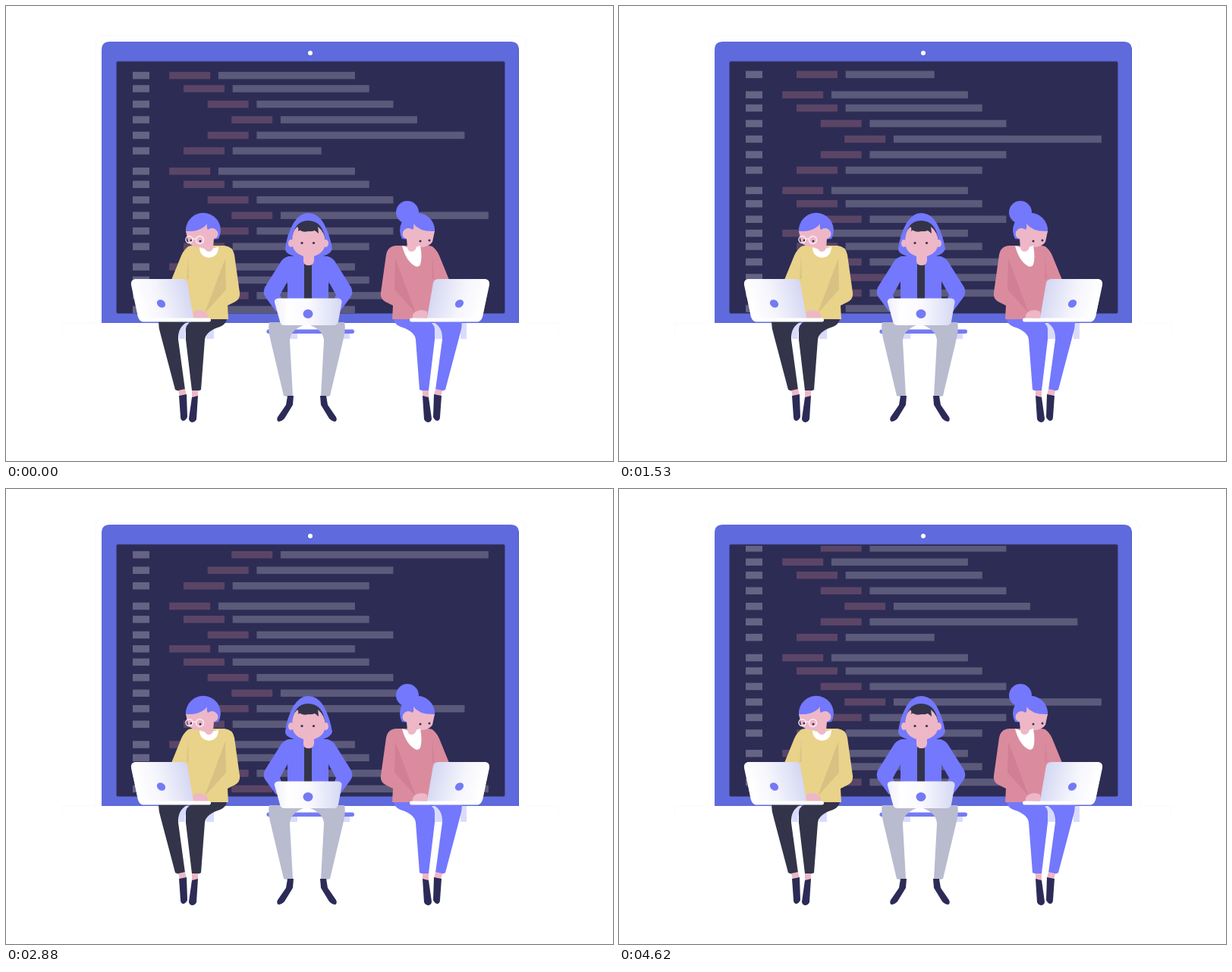
Recreate the animation shown at these times as an HTML page. Size 800 px wide and 600 px high, loop 4.65 s.

```html
<!DOCTYPE html>
<html lang="en">
<head>
<meta charset="utf-8">
<title>Coders</title>
<style>
  html, body { margin: 0; width: 100%; height: 100%; overflow: hidden; background: #fff; }
  svg { display: block; width: 800px; height: 600px; }
  .skin { fill: #edb7c7; }
  .blue { fill: #7378fd; }
  .dark { fill: #33344a; }
  .sock { fill: #2c2b57; }
  .pale { fill: #d9dbfd; }
  .logo { fill: #747af3; }
  .top { fill: var(--top); }
  .shade { fill: var(--shade); }
  .pants { fill: var(--pants); }
  .man { --top: #e9d28a; --shade: #d0b97f; --pants: #33344a; }
  .woman { --top: #da8c9e; --shade: #cc7890; --pants: #7378fd; }
</style>
</head>
<body>
<svg viewBox="0 0 800 600">
  <defs>
    <clipPath id="view"><rect x="146" y="75" width="511" height="330"/></clipPath>
    <linearGradient id="lid" x1="0" y1=".5" x2="1" y2=".3">
      <stop offset=".1" stop-color="#fff"/><stop offset=".45" stop-color="#f4f4fc"/><stop offset="1" stop-color="#d0d3f1"/>
    </linearGradient>
    <linearGradient id="lidFront">
      <stop offset="0" stop-color="#eeeef8"/><stop offset=".2" stop-color="#fff"/>
      <stop offset=".5" stop-color="#fafaff"/><stop offset="1" stop-color="#d5d8f3"/>
    </linearGradient>

    <g id="sitter">
      <path class="pants" d="M201 416H240Q226 423 227 440L236 506Q229 509 223 506L204 434Q201 425 201 416Z"/>
      <path class="pants" d="M237 426Q238 416 250 415L275 409H291Q292 419 282 423Q263 429 262 440L257 506Q251 509 245 507L237 440Z"/>
      <path class="skin" d="M227 507L236 505L238 513L229 515ZM245 507H253V515L245 517Z"/>
      <path class="sock" d="M228 514L238 512L239 542Q237 547 233 547Q230 546 230 542ZM245 516L253 514L251 545Q249 549 245 549Q241 548 241 544Z"/>
      <path class="top" d="M238 319Q240 316 246 316H288Q299 317 301 328L308 378Q309 386 302 390L292 395L293 413H242L236 361H218L229 334Q233 323 238 319Z"/>
      <path class="shade" d="M289 333L290 374L262 405Z" opacity=".65"/>
      <path class="shade" d="M240 329L241 360H238Z" opacity=".5"/>
      <path class="blue" d="M237 298A23 23 0 1 1 280 307L270 308L250 300Z"/>
      <path class="skin" d="M237 297Q257 298 265 287Q264 292 266 295Q274 290 279 298Q281 305 274 307L273 319Q272 324 267 324Q261 323 260 318Q245 319 240 311Z"/>
      <path class="skin" d="M246 411L247 403Q254 399 262 403Q267 406 266 412Z"/>
      <path fill="#d9dbf3" d="M171 360L165 365L174 410L180 416H190Z"/>
      <path fill="url(#lid)" d="M170 360H231Q238 360 239 365L247 411V416H180Q176 416 174 410L165 368Q164 361 170 360Z"/>
      <rect x="178" y="411.5" width="92" height="5" rx="2.5" fill="#fff"/>
      <ellipse class="logo" cx="204.5" cy="392.5" rx="6" ry="4.8" transform="rotate(35 204.5 392.5)"/>
      <g class="dark"><circle cx="256" cy="310" r="1.5"/><circle cx="244" cy="309" r="1.5"/></g>
    </g>

    <g id="sleeve">
      <path class="blue" d="M393 330H372Q366 332 363 336L341 371Q338 379 342 384L356 403L365 390L361 381L371 363V392H393Z"/>
    </g>
    <g id="leg">
      <path fill="#b9bbcf" d="M347 417H397L392 421Q374 428 374 442L378 514Q372 516 366 514L348 438Q345 425 347 417Z"/>
      <path class="sock" d="M371 514H379L378 526L367 544Q363 548 359 548Q356 546 358 542L369 526Z"/>
    </g>
  </defs>

  <path d="M75 434H74V418H118V50Q118 39 129 39H673Q685 39 685 50V418H728V434" fill="none" stroke="#fafafb"/>
  <path d="M126 418V58Q126 47 137 47H665Q676 47 676 58V418Z" fill="#5f6adc"/>
  <path d="M675.5 56V418" stroke="#5058bd"/>
  <rect x="145.5" y="73" width="512" height="332.5" rx="2" fill="#2d2c54" stroke="#4b50a0" stroke-width=".7"/>
  <circle cx="401" cy="62" r="3" fill="#fff"/>
  <g clip-path="url(#view)"><g id="code"></g></g>

  <path class="pale" d="M226 418H274V439H264V430H236V439H228ZM540 418H607V439H599V430H576V439H564V430H540ZM374 432H384V439H374ZM441 432H453V439H441Z"/>

  <g class="man">
    <use href="#sitter"/>
    <path d="M255 318Q260 321 267 320Q274 321 280 317Q280 331 267 332Q255 330 255 318Z" fill="#fff"/>
    <path class="skin" d="M261 317H273Q273 324 267 324Q262 323 261 317Z"/>
    <g fill="none" stroke="#fbeef4" stroke-width="1.4">
      <circle cx="241.500" cy="308" r="4.500"/><circle cx="255.500" cy="308.500" r="5"/><path d="M246 307L250.500 307"/>
    </g>
  </g>

  <g class="woman">
    <circle class="blue" cx="529" cy="272" r="15"/>
    <use href="#sitter" transform="translate(802) scale(-1 1)"/>
    <path d="M522 316Q534 321 546 316Q549 332 546 341Q544 345 539 343Q527 336 522 316Z" fill="#fff"/>
    <path class="skin" d="M529 317H541Q540 324 534 324Q529 323 529 317Z"/>
  </g>

  <rect class="logo" x="343.500" y="426.500" width="115.500" height="5.500" rx="2.700"/>
  <use href="#leg"/>
  <use href="#leg" transform="translate(793) scale(-1 1)"/>
  <rect class="dark" x="391" y="328" width="17" height="64"/>
  <use href="#sleeve"/>
  <use href="#sleeve" transform="translate(796) scale(-1 1)"/>
  <path class="blue" d="M368 320Q370 302 379 286Q387 273 398 273Q411 273 419 287Q427 302 430 320Q429 326 418 330L408 334H390L377 329Q367 325 368 320Z"/>
  <path class="dark" d="M377 310Q379 283 398 283Q418 283 421 310Q421 326 399 329Q377 326 377 310Z"/>
  <g class="skin">
    <ellipse cx="375.500" cy="313" rx="3.500" ry="5"/><ellipse cx="421.500" cy="313" rx="3.500" ry="5"/>
    <path d="M377 311Q377 297 384 291Q388 300 399 297Q409 298 411 291Q420 298 421 311Q421 325 406 330V336Q405 342 399 342Q392 342 392 336V330Q377 325 377 311Z"/>
  </g>
  <path class="dark" d="M385 297L386 290Q398 278 411 290L412 300Q404 293 399 293Q393 292 385 297Z"/>
  <g class="dark"><circle cx="390" cy="312.500" r="1.600"/><circle cx="405.500" cy="312.500" r="1.600"/></g>
  <path fill="url(#lidFront)" d="M359 385.500H438Q443 386 442.500 391L438 416Q437 421 432 421H367Q362 421 361 416L354 391Q353 386 359 385.500Z"/>
  <ellipse class="logo" cx="398" cy="406" rx="6.500" ry="6"/>
</svg>
<script>
  const LOOP = 4650, STEP = 30, SPEED = 304 / 4620;
  const code = document.getElementById("code");
  const indents = [0, 18.8, 50.5, 82, 50.5, 18.8];
  const offsets = [0, 17.4, 37.9, 58.4, 78.9, 99.4];
  const blocks = [
    [180, 180, 180, 180, 274, 117],
    [180, 180, 180, 274, 180, 180],
    [180, 180, 180]
  ];

  function bar(x, y, width, fill) {
    return `<rect x="${x}" y="${y - 4.75}" width="${width}" height="9.5" fill="${fill}"/>`;
  }

  let bars = "";
  for (let copy = 0; copy < 2; copy++) {
    blocks.forEach((widths, block) => widths.forEach((width, row) => {
      const x = 215.2 + indents[row];
      const y = 91.6 + copy * 308.7 + block * 126.2 + offsets[row];
      bars += bar(167, y, 22, "#656485") + bar(x, y, 54, "#5b4566") + bar(x + 64.7, y, width, "#5c5a7b");
    }));
  }
  code.innerHTML = bars;

  function draw() {
    const time = Math.floor(performance.now() % LOOP / STEP) * STEP;
    code.setAttribute("transform", `translate(0 ${-time * SPEED})`);
    requestAnimationFrame(draw);
  }
  draw();
</script>
</body>
</html>
```
